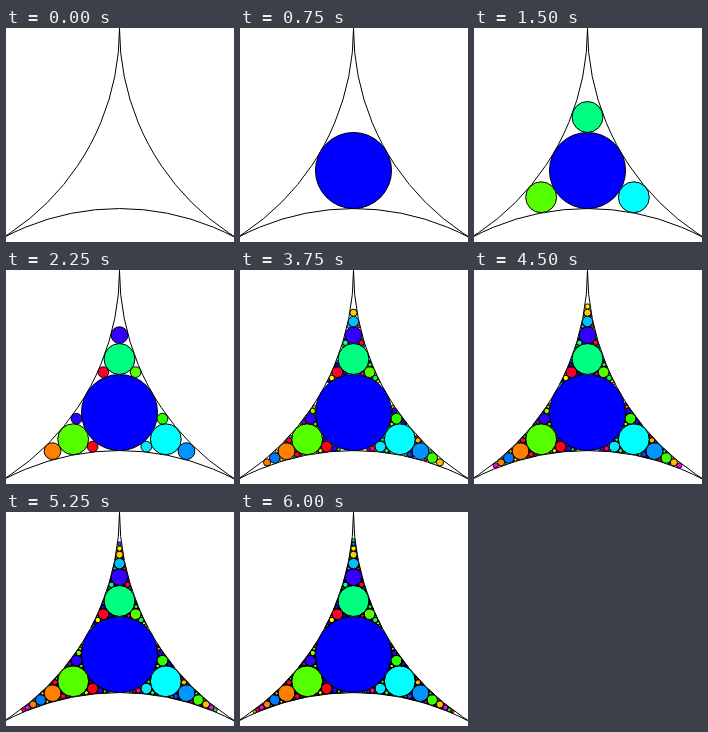
Animation of 228 by 214 pixels, one loop 6750 ms. Source, as an HTML page with a canvas:

```html
<!DOCTYPE html>
<html lang="en">
<head>
<meta charset="utf-8">
<title>Apollonian gasket</title>
<style>
  html, body { margin: 0; width: 100%; height: 100%; overflow: hidden; background: #fff; }
  canvas { display: block; }
</style>
</head>
<body>
<canvas id="stage" width="228" height="214"></canvas>
<script>
const ctx = document.getElementById('stage').getContext('2d');
const STEP = 750, LEVELS = 8;
const CX = 113.5, CY = 142.5, R = 246;

// Hues of the larger circles, keyed by their path through the gaps:
// 0 = towards the right, 1 = towards the left, 2 = towards the top.
const HUES = {
  '': 240, 0: 180, 1: 100, 2: 150,
  '00': 205, '01': 185, '02': 110,
  10: 355, 11: 30, 12: 250,
  20: 100, 21: 350, 22: 252,
  '000': 105, 111: 212, 222: 195,
  '0000': 45, 1111: 30, 2222: 48,
  '00000': 300, 11111: 305, 22222: 55
};

function hueOf(path) {
  if (path in HUES) return HUES[path];
  let seed = 7;
  for (const digit of path) seed = (seed * 31 + Number(digit) * 17 + 5) % 9973;
  return seed * 137.5 % 360;
}

// A circle is [k, k*x, k*y] with curvature k, so Descartes' theorem is linear.
const bend = (k, x, y) => [k, k * x, k * y];

const outer = [210, 330, 90].map(deg => {
  const a = deg * Math.PI / 180, d = 2 * R / Math.sqrt(3);
  return bend(1 / R, CX + d * Math.cos(a), CY + d * Math.sin(a));
});
const enclosing = bend((3 - 2 * Math.sqrt(3)) / R, CX, CY);
const levels = Array.from({ length: LEVELS }, () => []);

function fillGap(three, opposite, path) {
  const circle = opposite.map((v, i) => 2 * (three[0][i] + three[1][i] + three[2][i]) - v);
  levels[path.length].push({ circle, color: `hsl(${hueOf(path)}, 100%, 50%)` });
  if (path.length + 1 === LEVELS) return;
  three.forEach((replaced, slot) => {
    fillGap(three.map((c, i) => i === slot ? circle : c), replaced, path + slot);
  });
}

function drawCircle([k, kx, ky], color) {
  ctx.beginPath();
  ctx.arc(kx / k, ky / k, 1 / k, 0, 2 * Math.PI);
  if (color) {
    ctx.fillStyle = color;
    ctx.fill();
  }
  ctx.stroke();
}

function draw(depth) {
  ctx.fillStyle = '#fff';
  ctx.fillRect(0, 0, 228, 214);
  ctx.strokeStyle = '#000';
  ctx.lineWidth = 1;
  outer.forEach(c => drawCircle(c));
  levels.slice(0, depth).flat().forEach(({ circle, color }) => drawCircle(circle, color));
}

let shown = -1;
function tick() {
  const depth = Math.floor(performance.now() / STEP) % (LEVELS + 1);
  if (depth !== shown) draw(shown = depth);
  requestAnimationFrame(tick);
}

fillGap(outer, enclosing, '');
tick();
</script>
</body>
</html>
```
